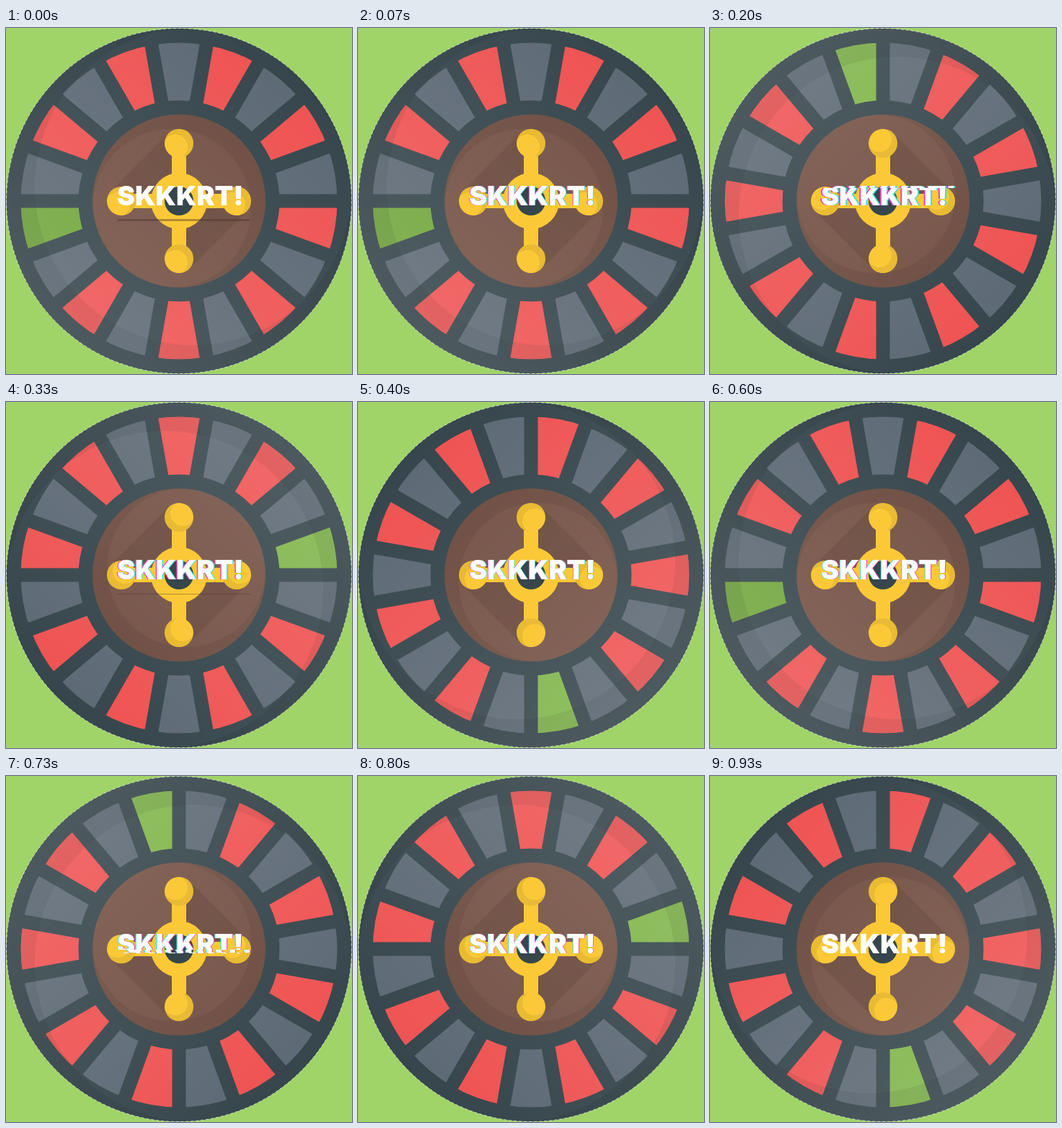
Write an HTML page with a canvas that moves like this. It is 480 by 480 pixels and loops after 990 ms.

```html
<!DOCTYPE html>
<html lang="en">
<head>
<meta charset="utf-8">
<title>Roulette</title>
<style>
html, body { margin: 0; width: 100%; height: 100%; overflow: hidden; background: #a0d468; }
canvas { display: block; width: 480px; height: 480px; }
</style>
</head>
<body>
<canvas id="stage" width="480" height="480"></canvas>
<script>
const ctx = document.getElementById('stage').getContext('2d');
const LOOP = 990, STEPS = 15, TAU = Math.PI * 2, RAD = Math.PI / 180;
const DARK = '#36464c', GOLD = '#fbc937';

function disc(x, y, r, fill) {
  ctx.beginPath();
  ctx.arc(x, y, r, 0, TAU);
  ctx.fillStyle = fill;
  ctx.fill();
}

function line(x1, y1, x2, y2, width, color) {
  ctx.beginPath();
  ctx.moveTo(x1, y1);
  ctx.lineTo(x2, y2);
  ctx.lineWidth = width;
  ctx.strokeStyle = color;
  ctx.stroke();
}

// Darkens the part of a disc that lies outside a smaller, shifted disc
function crescent(x, y, r, dx, dy, inner, alpha) {
  ctx.save();
  ctx.beginPath();
  ctx.arc(x, y, r, 0, TAU);
  ctx.clip();
  ctx.beginPath();
  ctx.rect(x - r, y - r, r * 2, r * 2);
  ctx.arc(x + dx, y + dy, inner, 0, TAU);
  ctx.fillStyle = `rgba(0,0,0,${alpha})`;
  ctx.fill('evenodd');
  ctx.restore();
}

function pockets(green) {
  const half = 10 * RAD;
  for (let i = 0; i < 18; i++) {
    const a = (i * 20 - 90) * RAD;
    ctx.beginPath();
    ctx.arc(0, 0, 219.5, a - half, a + half);
    ctx.arc(0, 0, 139.5, a + half, a - half, true);
    ctx.fillStyle = i === 13 ? green : i % 2 ? '#ef5353' : '#5d6975';
    ctx.fill();
  }
  for (let i = 0; i < 18; i++) {
    const a = (i * 20 - 80) * RAD, c = Math.cos(a), s = Math.sin(a);
    line(130 * c, 130 * s, 228 * c, 228 * s, 19, DARK);
  }
}

function cross() {
  const shade = 'rgba(40,20,15,.1)';
  line(-80, 0, 0, -80, 40, shade);
  line(0, 80, 80, 0, 40, shade);
  line(0, -80, 0, 80, 20, GOLD);
  line(-80, 0, 80, 0, 20, GOLD);
  for (let i = 0; i < 4; i++) {
    const x = 80 * Math.cos(i * 90 * RAD), y = 80 * Math.sin(i * 90 * RAD);
    disc(x, y, 20, GOLD);
    crescent(x, y, 20, -5, 5, 17, 0.07);
  }
  disc(0, 0, 39, GOLD);
  disc(0, 0, 20, DARK);
}

function wheel(turn) {
  ctx.save();
  ctx.translate(240, 240);
  ctx.rotate(turn * 90 * RAD);
  disc(0, 0, 239.5, DARK);
  pockets(turn % 4 ? '#80b54a' : '#72a63d');
  crescent(0, 0, 239.5, 20, -20, 220, 0.07);
  disc(0, 0, 120, '#755246');
  crescent(0, 0, 120, -10, 10, 110, 0.07);

  const sheen = ctx.createLinearGradient(-170, 170, 170, -170);
  sheen.addColorStop(0, 'rgba(255,255,255,.13)');
  sheen.addColorStop(1, 'rgba(255,255,255,0)');
  disc(0, 0, 239.5, sheen);
  cross();

  ctx.beginPath();
  ctx.arc(0, 0, 239.5, 0, TAU);
  ctx.setLineDash([4, 3]);
  ctx.lineWidth = 1;
  ctx.strokeStyle = 'rgba(235,240,235,.7)';
  ctx.stroke();
  ctx.restore();
}

function word(x, fill) {
  ctx.fillStyle = fill;
  ctx.fillText('SKKKRT!', 154 + x, 246);
}

// White word over its cyan and magenta ghosts, seen through a horizontal band
function band(y, h, x, split) {
  ctx.save();
  ctx.beginPath();
  ctx.rect(0, y, 480, h);
  ctx.clip();
  if (Math.abs(split) > 0.1) {
    word(x + split, '#35e0d8');
    word(x - split, '#e645b4');
  }
  word(x, '#fff');
  ctx.restore();
}

function title(step) {
  ctx.font = '900 37.5px Inter, Lato, sans-serif';
  // The colour split is a fading wave
  const split = 2.5 * Math.exp(-step / 14) * Math.sin(step * Math.PI / 7);

  // Every fourth step a thin slice slips right, lower each time
  const fall = Math.max(0, step - 3) / 8;
  const top = 218 + Math.round(23 * fall ** 2.5);
  const slip = step % 4 === 3 ? 12 : 0;
  band(0, top, 0, split);
  band(top, 4, slip, split);
  band(top + 4, 480, 0, split);

  // A thinning streak below the word
  const streak = 3 - step * 0.4;
  if (step % 5 === 0 && streak > 0) line(155, 266.5, 338, 266.5, streak, 'rgba(70,45,40,.4)');
}

function stepAt(t) {
  let k = STEPS - 1;
  while (k && Math.round(k * 20 / 3) * 10 > t) k--;
  return k;
}

function frame() {
  const step = stepAt(performance.now() % LOOP);
  ctx.fillStyle = '#a0d468';
  ctx.fillRect(0, 0, 480, 480);
  wheel(Math.floor(step / 2));
  title(step);
  requestAnimationFrame(frame);
}
frame();
</script>
</body>
</html>
```
